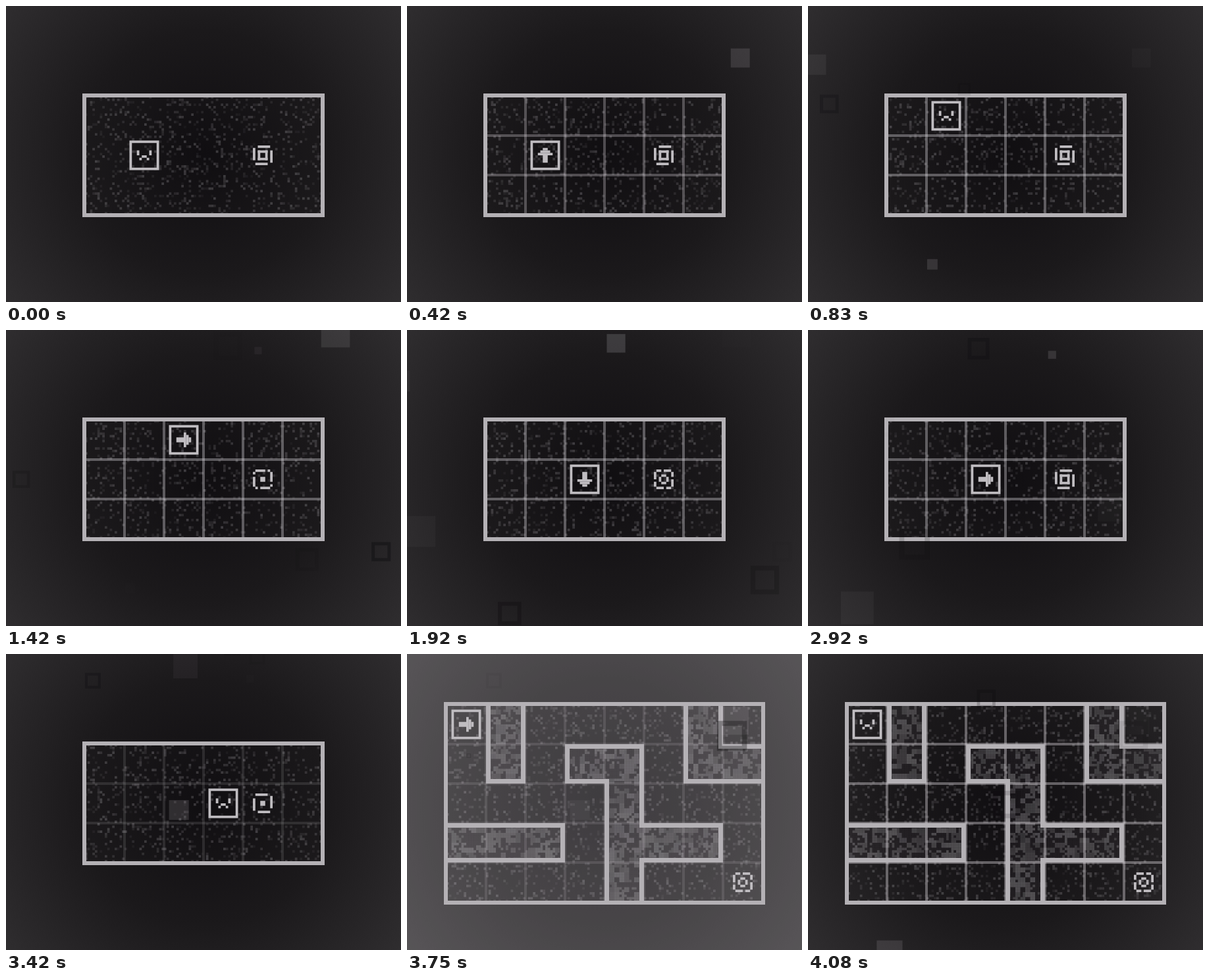
Write an HTML page with a canvas that moves like this. It is 600 px wide and 450 px high and loops after 4.16 s.

```html
<!DOCTYPE html>
<html>
<head>
<meta charset="utf-8">
<style>
html, body { margin: 0; width: 100%; height: 100%; overflow: hidden; background: #1a181b; }
canvas { display: block; }
</style>
</head>
<body>
<canvas id="stage" width="600" height="450"></canvas>
<script>
const ctx = document.getElementById('stage').getContext('2d');
const LOOP = 4160, FPS = 12, SWITCH = 43;
const TILE = 60, PX = 3.75, CELLS = TILE / PX;
const LINE = '#b4b1b5', ICON = '#c0bdc1';

// '.' floor, '#' wall, 'P' start, 'G' goal
const levels = [
  ['......', '.P..G.', '......'],
  ['P#....#.', '.#.##.##', '....#...', '###.###.', '....#..G']
].map(map => {
  const find = mark => {
    const row = map.findIndex(line => line.includes(mark));
    return [map[row].indexOf(mark), row];
  };
  const cols = map[0].length, rows = map.length;
  return {
    map, cols, rows, start: find('P'), goal: find('G'),
    x: 300 - cols * TILE / 2, y: 227 - rows * TILE / 2
  };
});

const steps = { right: 5, down: 5 };
const turns = 'RDLU';
const path = 'URDRR', pathFrames = [5, 15, 22, 35.5, 41.6];

const clamp = v => Math.max(0, Math.min(1, v));
const white = a => `rgba(235,231,237,${a})`;

function hash(a, b = 0, c = 0) {
  let h = Math.imul(a, 374761393) ^ Math.imul(b, 668265263) ^ Math.imul(c, 1274126177);
  h = Math.imul(h ^ h >>> 15, 2246822519);
  h = Math.imul(h ^ h >>> 13, 3266489917);
  return ((h ^ h >>> 16) >>> 0) / 4294967296;
}

function fill(color, x, y, w, h) {
  ctx.fillStyle = color;
  ctx.fillRect(x, y, w, h);
}

function frameRect(color, x, y, w, h, line) {
  ctx.strokeStyle = color;
  ctx.lineWidth = line;
  ctx.strokeRect(x + line / 2, y + line / 2, w - line, h - line);
}

// Runs draw() in icon pixels around x, y
function icon(x, y, turn, draw) {
  ctx.save();
  ctx.translate(x, y);
  ctx.rotate(turn * Math.PI / 2);
  ctx.scale(PX, PX);
  draw((...rect) => fill(ICON, ...rect));
  ctx.restore();
}

function face(dot) {
  for (const flip of [1, -1]) {
    ctx.scale(flip, 1);
    dot(2, -2, 1, 2);
    dot(0, 0, 1, 1);
    dot(1, 1, 1, 1);
  }
}

function arrow(dot) {
  dot(-3, -1, 3, 2);
  for (let i = 0; i < 3; i++) dot(i, i - 3, 1, 6 - 2 * i);
}

// Four sides of six pixels with one running gap, and a pulsing core
function goal(dot, gap) {
  const core = Math.floor(gap / 2);
  for (let side = 0; side < 4; side++) {
    dot(-3, -4, gap, 1);
    dot(gap - 2, -4, 5 - gap, 1);
    if (core === 0) dot(-2, -2, 4, 1);
    if (core === 1) dot(-1, -2, 2, 1);
    if (core === 2) dot(-1, -1, 1, 1);
    ctx.rotate(Math.PI / 2);
  }
}

function background(frame) {
  const g = ctx.createRadialGradient(300, 225, 0, 300, 225, 375);
  g.addColorStop(0, '#100e11');
  g.addColorStop(.5, '#1b191b');
  g.addColorStop(1, '#2f2d2f');
  fill(g, 0, 0, 600, 450);
  if (frame >= SWITCH) fill(white(.32 * clamp(1 - (frame - SWITCH) / 6)), 0, 0, 600, 450);
}

// Squares that flare up and fade: filled light ones and dark outlines
function squares(frame) {
  for (let i = 0; i < 36; i++) {
    const age = (frame - 4 - i * 1.25) / 9;
    if (age < 0 || age > 1) continue;
    const fade = (1 - age) ** 2, size = 6 + 44 * hash(i, 1);
    const x = hash(i, 2) * 620 - 30, y = hash(i, 3) * 470 - 30;
    if (hash(i, 4) < .6) fill(white(.16 * fade), x, y, size, size);
    else frameRect(`rgba(8,7,9,${.4 * fade})`, x, y, size, size, size / 6);
  }
}

function floorAlpha(x, y, frame) {
  const epoch = Math.floor(frame / 4 + hash(x, y, 7));
  const v = hash(x, y, epoch + 20);
  return v < .17 ? .03 + v : 0;
}

function wallAlpha(x, y, frame) {
  const epoch = Math.floor(frame / 4) + 90;
  const blob = hash(x >> 1, y >> 1, epoch), grain = hash(x, y, epoch);
  return blob * .6 + grain * .4 > .47 ? .15 + .12 * hash(x >> 2, y >> 2, epoch) : .04;
}

function noise({ map, cols, rows, x, y }, frame) {
  for (let j = 0; j < rows * CELLS; j++) for (let i = 0; i < cols * CELLS; i++) {
    const wall = map[Math.floor(j / CELLS)][Math.floor(i / CELLS)] === '#';
    const a = (wall ? wallAlpha : floorAlpha)(i, j, frame);
    if (a) fill(white(a), x + i * PX, y + j * PX, PX, PX);
  }
}

// Walls carry an edge strip wherever they touch floor, corners included
function walls({ map, cols, rows, x, y }) {
  const strip = d => d < 0 ? [0, 7] : d > 0 ? [TILE - 7, 7] : [0, TILE];
  for (let r = 0; r < rows; r++) for (let c = 0; c < cols; c++) {
    if (map[r][c] !== '#') continue;
    for (let dy = -1; dy < 2; dy++) for (let dx = -1; dx < 2; dx++) {
      if ((map[r + dy]?.[c + dx] ?? '#') === '#') continue;
      const [sx, w] = strip(dx), [sy, h] = strip(dy);
      fill(LINE, x + c * TILE + sx, y + r * TILE + sy, w, h);
    }
  }
}

function board(level, frame, grid) {
  const { cols, rows, x, y } = level, w = cols * TILE, h = rows * TILE;
  noise(level, frame);
  for (let c = 1; c < cols; c++) fill(white(grid), x + c * TILE - 2, y, 4, h);
  for (let r = 1; r < rows; r++) fill(white(grid), x, y + r * TILE - 2, w, 4);
  walls(level);
  frameRect(LINE, x - 4, y - 4, w + 8, h + 8, 6);
}

function playerAt(level, frame) {
  let [col, row] = level.start, turn = null;
  if (level === levels[1]) return { col, row, turn: frame < SWITCH + 4 ? 0 : null };
  pathFrames.forEach((start, i) => {
    const k = clamp(frame - start), ease = k * (2 - k);
    const dir = turns.indexOf(path[i]), angle = dir * Math.PI / 2;
    col += Math.cos(angle) * ease;
    row += Math.sin(angle) * ease;
    if (frame >= start - .5 && frame < start + 3) turn = dir;
  });
  return { col, row, turn };
}

function render(ms) {
  const frame = Math.floor((ms + 4) * FPS / 1000);
  const second = frame >= SWITCH, level = levels[+second];
  const grid = second
    ? .4 * clamp((frame - SWITCH) / 6.5)
    : .34 * Math.min(clamp(frame / 6), clamp((SWITCH - frame) / 6));
  const center = (c, r) => [level.x + c * TILE + 30, level.y + r * TILE + 30];

  background(frame);
  board(level, frame, grid);
  squares(frame);

  const spin = Math.round((second ? 2 : 0) - 1.2 * frame);
  icon(...center(...level.goal), 0, dot => goal(dot, (spin % 6 + 6) % 6));

  const { col, row, turn } = playerAt(level, frame);
  const [x, y] = center(col, row);
  frameRect(ICON, x - 6 * PX, y - 6 * PX, 12 * PX, 12 * PX, PX);
  icon(x, y, turn ?? 0, turn === null ? face : arrow);
}

const begin = performance.now();
function tick() {
  render((performance.now() - begin) % LOOP);
  requestAnimationFrame(tick);
}
tick();
</script>
</body>
</html>
```
